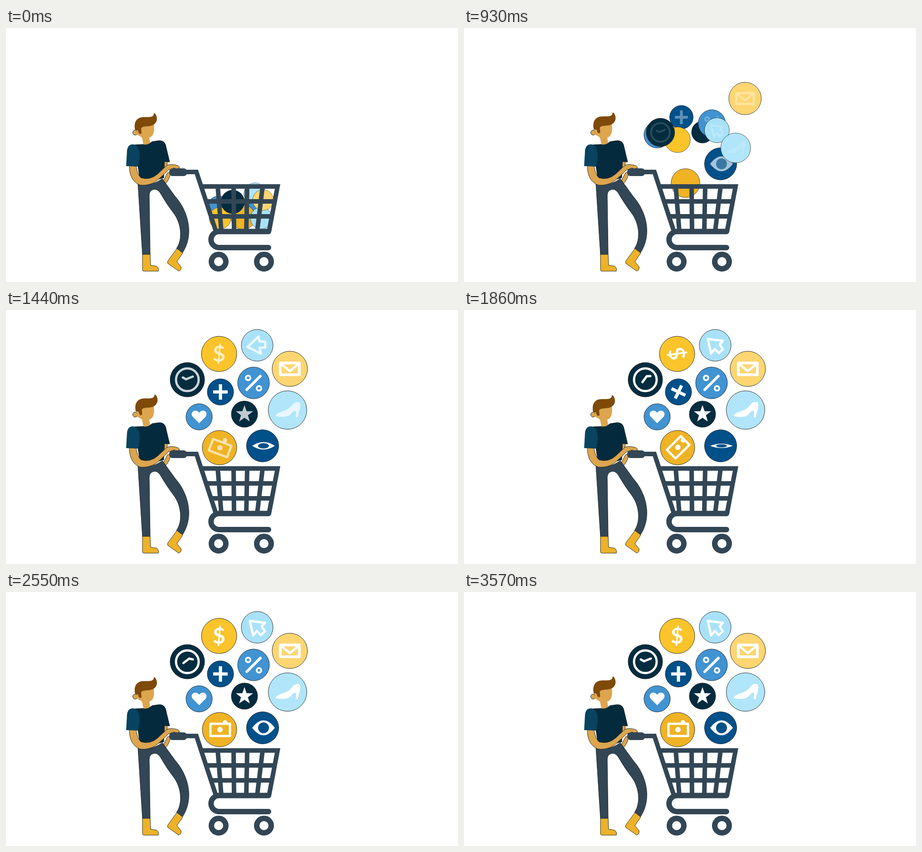
Animation, 997 px wide and 561 px high, one loop 3600 ms. Source, as an HTML page:

```html
<!DOCTYPE html>
<html lang="en">
<head>
<meta charset="utf-8">
<title>Shopping cart</title>
<style>
html, body { margin: 0; width: 100%; height: 100%; overflow: hidden; background: #fff; }
svg { display: block; width: 997px; height: 561px; }
.outline { stroke: #14191c; stroke-width: .9; }
.line { fill: none; stroke: #fff; stroke-linejoin: round; }
.cart { fill: none; stroke: #324655; stroke-width: 10; }
</style>
</head>
<body>
<svg viewBox="0 0 997 561">
  <g class="outline">
    <path fill="#dca54e" d="M350 294H356L355 306L349 309ZM346 340L356 320L364 317Q361 336 350 346Z"/>
    <path fill="#324655" d="M291 344Q318 352 345 333L374 373C400 402 417 455 389 497L376 487C391 465 386 430 369 408Q355 390 340 364Q333 354 324 357Q316 360 316 370L318 501H301Z"/>
    <path fill="#edb228" d="M301 500H318L319 524L332 526Q338 530 336 537H304Q301 537 301 533ZM377 487L390 497L377 516L386 527Q388 534 381 537L357 520Q355 516 358 513Z"/>
    <path fill="#042b3d" d="M284 258L303 257Q318 256 322 251L335 249Q348 247 352 258L361 296L349 295L348 331L320 338L295 332L291 305Z"/>
    <circle fill="#dca54e" cx="285" cy="231" r="5.5"/>
    <path fill="#dca54e" stroke="none" d="M290 213H326C328 226 326 240 316 242L318 254Q310 259 303 257L300 242L289 235Z"/>
    <path fill="#dca54e" d="M272 304L287 305Q290 325 298 331Q318 337 335 322L352 306Q357 300 370 302Q382 303 383 309L377 311L369 309L372 314L367 316L360 312Q345 327 332 338Q316 349 296 347Q272 338 272 304Z"/>
    <path fill="#08435f" stroke="none" d="M265 305L267 270Q269 257 280 257Q293 258 295 278Q295 295 291 306Z"/>
    <path id="hair" fill="#7f4908" stroke="none" d="M328 188C335 196 335 208 325 214C316 219 301 215 298 222L299 232Q296 236 293 232L291 226L285 226C281 210 287 198 301 197C313 196 326 199 326 189Z"/>
  </g>
  <g id="bubbles"></g>
  <g class="cart">
    <rect x="360" y="310" width="39" height="17" rx="7" fill="#324655" stroke="none"/>
    <path d="M395 318H420L463 449M431 350H599L580 450"/>
    <path d="M440 383H592M450 416H586M467 350L475 449M502 350L503 449M532 350L530 449M566 350L554 449"/>
    <path stroke-width="12" stroke-linecap="round" d="M579 449.500H470A17.500 17.500 0 0 0 470 485H579"/>
    <circle cx="469" cy="516" r="16" stroke-width="12"/>
    <circle cx="569" cy="516" r="16" stroke-width="12"/>
  </g>
</svg>
<script>
const LOOP = 3600;
const NAVY = '#032c3f', DEEP = '#00508a', BLUE = '#4193d2', ICE = '#a9e2f8';
const line = (d, width, extra = '') => `<path class="line" stroke-width="${width}" d="${d}" ${extra}/>`;
const ring = (x, y, r, width) => `<circle class="line" cx="${x}" cy="${y}" r="${r}" stroke-width="${width}"/>`;
const solid = d => `<path d="${d}"/>`;

// from/to: x, y, radius; move, grow, fade, spin: start and end time in ms. Listed back to front.
const bubbles = [
  { color: NAVY, from: [523, 418, 24], to: [526, 230, 29], move: [40, 640], grow: [800, 1300], fade: [1000, 1590],
    icon: solid('M0 -20L4.700 -6.500L19 -6.200L7.600 2.500L11.800 16.200L0 8L-11.800 16.200L-7.600 2.500L-19 -6.200L-4.700 -6.500Z') },
  { color: DEEP, from: [548, 366, 23], to: [473, 181, 29], move: [76, 1156], grow: [500, 1200], fade: [750, 1250], spin: [1440, 2040],
    icon: line('M0 -17V17M-16 0H16', 7) },
  { color: BLUE, from: [469, 395, 24], to: [426, 236, 29], move: [100, 800], fade: [900, 1400],
    icon: solid('M0 14L-14 0C-22 -10 -8 -20 0 -9C8 -20 22 -10 14 0Z') },
  { color: DEEP, from: [545, 388, 22], to: [566, 300, 35.5], move: [420, 900], fade: [700, 1050],
    icon: `<g id="eye">${solid('M-23 0Q2 -33 27 0Q2 33 -23 0Z')}<circle cx="2" r="12" fill="${DEEP}"/></g>` },
  { color: BLUE, from: [549, 380, 23], to: [546, 161, 35], move: [520, 1140], fade: [750, 1350],
    icon: line('M-15 15L15 -15', 6, 'stroke-linecap="round"') + ring(-12, -11, 5, 4) + ring(12, 12, 5, 4) },
  { color: '#fac42a', from: [472, 420, 24], to: [470, 97, 39], move: [620, 1220], fade: [1000, 1620], spin: [1500, 2080],
    icon: '<text y="17" text-anchor="middle" font-family="Lato, sans-serif" font-weight="700" font-size="48">$</text>' },
  { color: '#efb324', from: [523, 418, 27], to: [471, 304, 38], move: [560, 1190], fade: [1050, 1680], spin: [1320, 2040],
    icon: `<g class="spin">${line('M-20 -13H23V14H-20Z', 5)}<circle cx="1" r="6"/></g><circle cx="12" cy="-16" r="5"/>` },
  { color: ICE, from: [563, 420, 24], to: [554, 78, 35], move: [610, 1210], fade: [700, 1650], spin: [1000, 1600],
    icon: line('M-16 -14L17 -10L10 -2L17 9L8 17L-1 8L-9 18Z', 5) },
  { color: '#b0e5fa', from: [549, 366, 24], to: [621, 221, 42.5], move: [540, 1180], fade: [800, 1720],
    icon: solid('M-27 13Q-24 7 -12 3Q2 0 12 -13Q18 -20 27 -17Q30 -8 25 4L23 16H18L19 2Q14 0 8 8Q4 13 -2 14Q-14 17 -27 13Z') },
  { color: '#fdd672', from: [567, 380, 23], to: [626, 130, 39], move: [297, 1117], fade: [750, 1350],
    icon: line('M-21 -13H21V13H-21Z', 6) + line('M-18 -10L0 5L18 -10', 5) },
  { color: NAVY, from: [500, 384, 26], to: [400, 154, 38], move: [570, 1180], fade: [812, 1600],
    icon: ring(0, 0, 25, 5) + line('M-10 -5L-3 -1L12 -7', 5, 'id="hands" stroke-linecap="round"') },
];

const ramp = (t, [start, end]) => Math.min(1, Math.max(0, (t - start) / (end - start)));
const ease = (t, span) => {
  const u = ramp(t, span);
  return u < .5 ? 2 * u * u : 1 - 2 * (1 - u) ** 2;
};
const mix = (a, b, k) => a + (b - a) * k;
const byId = id => document.getElementById(id);

byId('bubbles').innerHTML = bubbles.map(({ color, to, icon }) =>
  `<g><circle class="outline" r="${to[2]}" fill="${color}"/><g fill="#fff">${icon}</g></g>`).join('');
bubbles.forEach((b, i) => {
  b.node = byId('bubbles').children[i];
  b.iconNode = b.node.lastChild;
  b.spinNode = b.iconNode.querySelector('.spin') || b.iconNode;
});
const [hair, eye, hands] = ['hair', 'eye', 'hands'].map(byId);
const setTransform = (node, value) => node.setAttribute('transform', value);

function draw(t) {
  for (const { from, to, move, grow = move, fade, spin, node, iconNode, spinNode } of bubbles) {
    const k = ease(t, move);
    const r = mix(from[2], to[2], ease(t, grow) ** 2);
    setTransform(node, `translate(${mix(from[0], to[0], k)} ${mix(from[1], to[1], k)}) scale(${r / to[2]})`);
    // Parts fade one by one, so overlapping ones show through each other.
    for (const name of ['fill-opacity', 'stroke-opacity']) iconNode.setAttribute(name, ramp(t, fade));
    if (spin) setTransform(spinNode, `rotate(${360 * ease(t, spin)})`);
  }
  const open = 1 - ease(t, [1280, 1600]) + ease(t, [1700, 2120]);
  setTransform(eye, `scale(1 ${Math.max(.04, open)})`);
  setTransform(hands, `rotate(${1080 * ramp(t, [1590, 3570])} 1 -3.5)`);
  const sway = 1.5 * (ease(t, [480, 900]) - ease(t, [1480, 1860]) + ease(t, [2700, 3240]));
  setTransform(hair, `translate(${sway} ${-sway})`);
}

const began = performance.now();
function tick() {
  draw((performance.now() - began) % LOOP);
  requestAnimationFrame(tick);
}
tick();
</script>
</body>
</html>
```
